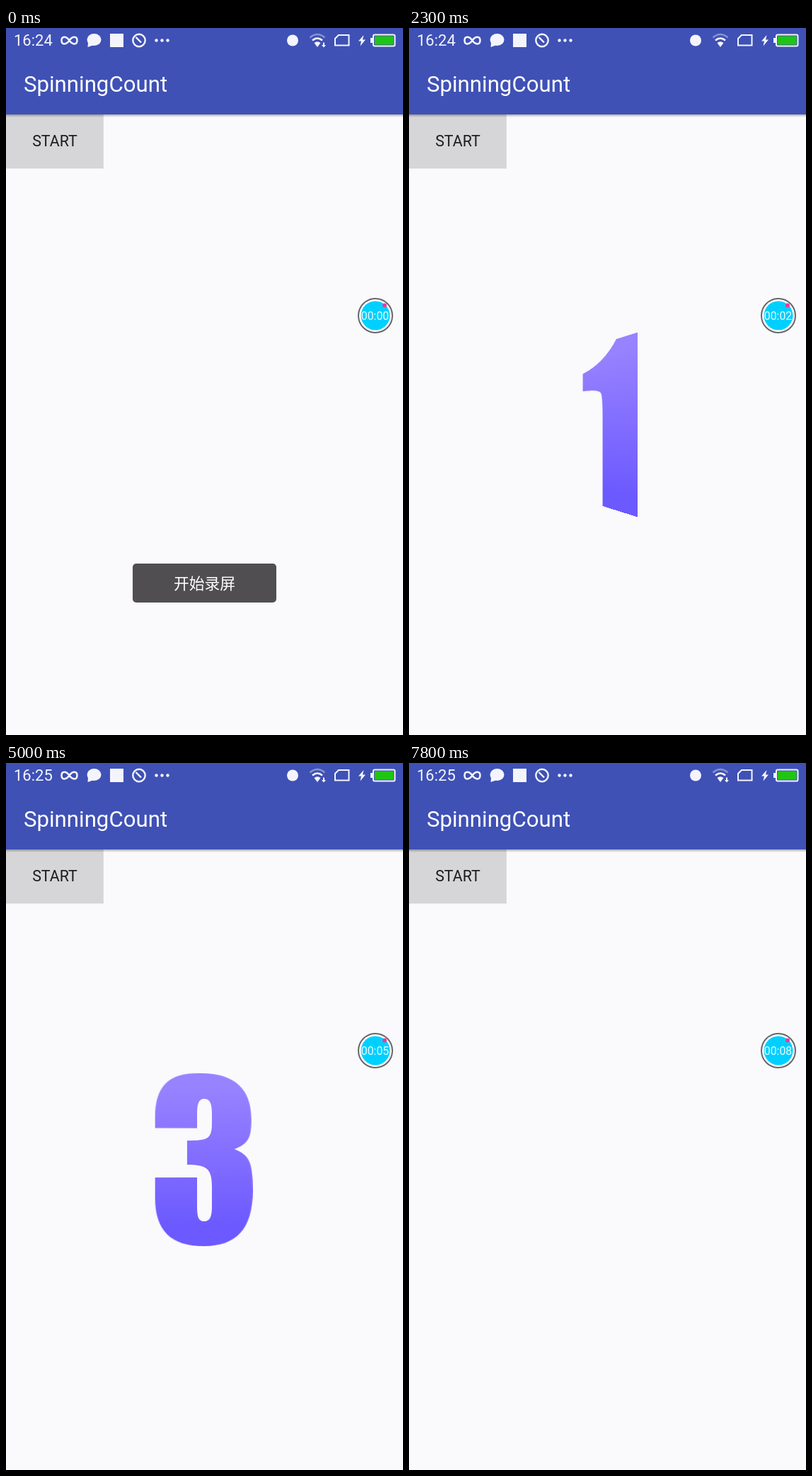
An HTML page that plays this animation: 561 by 998 pixels, repeating every 8000 ms.

```html
<!DOCTYPE html>
<html lang="zh">
<head>
<meta charset="utf-8">
<style>
  html, body { margin: 0; width: 100%; height: 100%; overflow: hidden; background: #faf9fc; }
  svg { position: absolute; left: 0; top: 0; width: 561px; height: 998px; font-family: Roboto, sans-serif; }
  #digit { transform-origin: 280.5px 560px; }
</style>
</head>
<body>
<svg viewBox="0 0 561 998">
  <defs>
    <linearGradient id="shade" x2="0" y2="1">
      <stop stop-color="#000" stop-opacity=".3"/>
      <stop offset="1" stop-color="#000" stop-opacity="0"/>
    </linearGradient>
  </defs>

  <!-- button and app bar -->
  <rect y="197" width="138" height="2" fill="url(#shade)" opacity=".7"/>
  <rect x="137" y="122" width="1" height="75" fill="#dddce0"/>
  <rect y="122" width="137" height="75" fill="#d6d5d7"/>
  <text x="69" y="167" font-size="21.4" text-anchor="middle" fill="#1c1c1e">START</text>
  <rect y="122" width="561" height="4" fill="url(#shade)"/>
  <rect width="561" height="122" fill="#3f51b5"/>
  <text x="25" y="90" font-size="31.2" fill="#fff">SpinningCount</text>

  <!-- status bar -->
  <g fill="#f4f5fc">
    <text id="clock" x="11" y="25" font-size="22"></text>
    <path d="M89.5 17.5C85 11 78.5 11 78.5 17.5S85 24 89.5 17.5S100.5 11 100.5 17.5S94 24 89.5 17.5Z" fill="none" stroke="#f4f5fc" stroke-width="2.5"/>
    <ellipse cx="124.5" cy="16.5" rx="10" ry="8.5"/>
    <path d="M116 20L115.5 27L124 24Z"/>
    <rect x="147" y="8" width="19" height="19"/>
    <g fill="none" stroke="#f4f5fc" stroke-width="2.4">
      <circle cx="188" cy="17.5" r="8.7"/>
      <path d="M183.5 13L191 20.5"/>
      <path d="M470 10H484.500V24.5H465V15Z" stroke-width="2"/>
      <rect x="519" y="9.5" width="30.5" height="16" rx="2" stroke-width="2"/>
    </g>
    <circle cx="212.5" cy="17.5" r="2.2"/>
    <circle cx="220.5" cy="17.5" r="2.2"/>
    <circle cx="228.5" cy="17.5" r="2.2"/>
    <circle cx="405" cy="17.5" r="8"/>
    <g fill="none" stroke="#f4f5fc" stroke-width="2.6">
      <path d="M429.5 13.5Q440 4.5 450.5 13.5" opacity=".4"/>
      <path d="M433 17.5Q440 11.5 447 17.5"/>
    </g>
    <path d="M435.5 21Q440 17.5 444.5 21L440 27Z"/>
    <path id="arrow" d="M448 20.5H450V24H452L449 27.5L446 24H448Z"/>
    <path d="M505.5 10L498 18.5H502L500.5 25.5L508 16.5H504Z"/>
    <rect x="515" y="14" width="3" height="7"/>
    <rect x="521" y="11.5" width="26.5" height="12" fill="#20c514"/>
  </g>

  <g id="toast">
    <rect x="179" y="756" width="203" height="55" rx="5" fill="#504e51"/>
    <text x="280.5" y="792" font-size="21.8" text-anchor="middle" fill="#fff" style="font-family:'Noto Sans CJK SC','Noto Sans CJK',sans-serif">开始录屏</text>
  </g>
</svg>

<svg id="digit" viewBox="0 0 561 998">
  <linearGradient id="violet" gradientUnits="userSpaceOnUse" x1="0" y1="440" x2="0" y2="680">
    <stop offset=".08" stop-color="#9782ff"/>
    <stop offset=".9" stop-color="#6c59ff"/>
  </linearGradient>
  <path id="glyph" fill="url(#violet)"/>
</svg>

<svg viewBox="0 0 561 998">
  <circle cx="522" cy="406" r="24" fill="#fff" stroke="#68666a" stroke-width="2"/>
  <circle cx="522" cy="406" r="20.5" fill="#00d0ff"/>
  <circle cx="535" cy="391.5" r="3" fill="#ee3a9c"/>
  <text id="timer" x="521.5" y="412" font-size="15.8" text-anchor="middle" fill="#e9fbff"></text>
</svg>

<script>
const LOOP = 8000, ENTER = 280, EXIT = 315;
const $ = id => document.getElementById(id);
const clamp = v => Math.min(1, Math.max(0, v));

const shapes = {
  1: 'M330 443V677H271.5V547Q271.5 519 268 514Q263 508 231 508V481Q274 472 296 443Z',
  2: 'M214.5 524V508C214.5 462 241 440.5 283 440.5C325 440.5 348.5 464 348.5 500' +
     'C348.5 540 334 558 318 583L279 640H343V679.5H214.5V645.5L270 553' +
     'C284 529 293 510 293 494C293 483 289 477 281 477C271 477 267 484 267 497V524.5Z',
  3: 'M211 515.5V500C211 454 233 438 272 438H276C324 438 347 460 347 503C347 529 343 537 323 545' +
     'C345 554 349 564 349 604C349 658 326 682 280 682C233 682 211 659 211 614V585H270V626' +
     'C270 641 272 647 280 647C288 647 291 641 291 626V598C291 572 283 567 256 567V533' +
     'C285 533 291 531 291 508V495C291 480 288 474 280 474C273 474 270 480 270 495V515.5Z'
};

// digit, start of turning in, start of turning away
const turns = [
  [3, 160, 887], [2, 1202, 1890], [1, 2205, 2985],
  [3, 4230, 4965], [2, 5280, 5985], [1, 6300, 6990]
];

function drawDigit(t) {
  const turn = turns.find(([, start, end]) => t >= start && t < end + EXIT);
  $('digit').style.visibility = turn ? 'visible' : 'hidden';
  if (!turn) return;
  const [digit, start, end] = turn;
  const before = 1 - clamp((t - start) / ENTER);
  const after = clamp((t - end) / EXIT);
  const angle = 90 * (after ** 2 - before ** 2);
  $('glyph').setAttribute('d', shapes[digit]);
  $('digit').style.transform = `perspective(300px) rotateY(${angle}deg)`;
}

function draw(now) {
  const t = now % LOOP;
  drawDigit(t);
  $('clock').textContent = t < 4400 ? '16:24' : '16:25';
  $('timer').textContent = '00:0' + Math.floor((t + 200) / 1000);
  $('toast').style.opacity = 1 - clamp((t - 1450) / 300);
  $('arrow').style.opacity = t < 600 || t >= 2800 ? 1 : 0;
  const up = t >= 6000 && t < 7600;
  $('arrow').setAttribute('transform', up ? 'rotate(180 449 24)' : '');
  requestAnimationFrame(draw);
}
requestAnimationFrame(draw);
</script>
</body>
</html>
```
